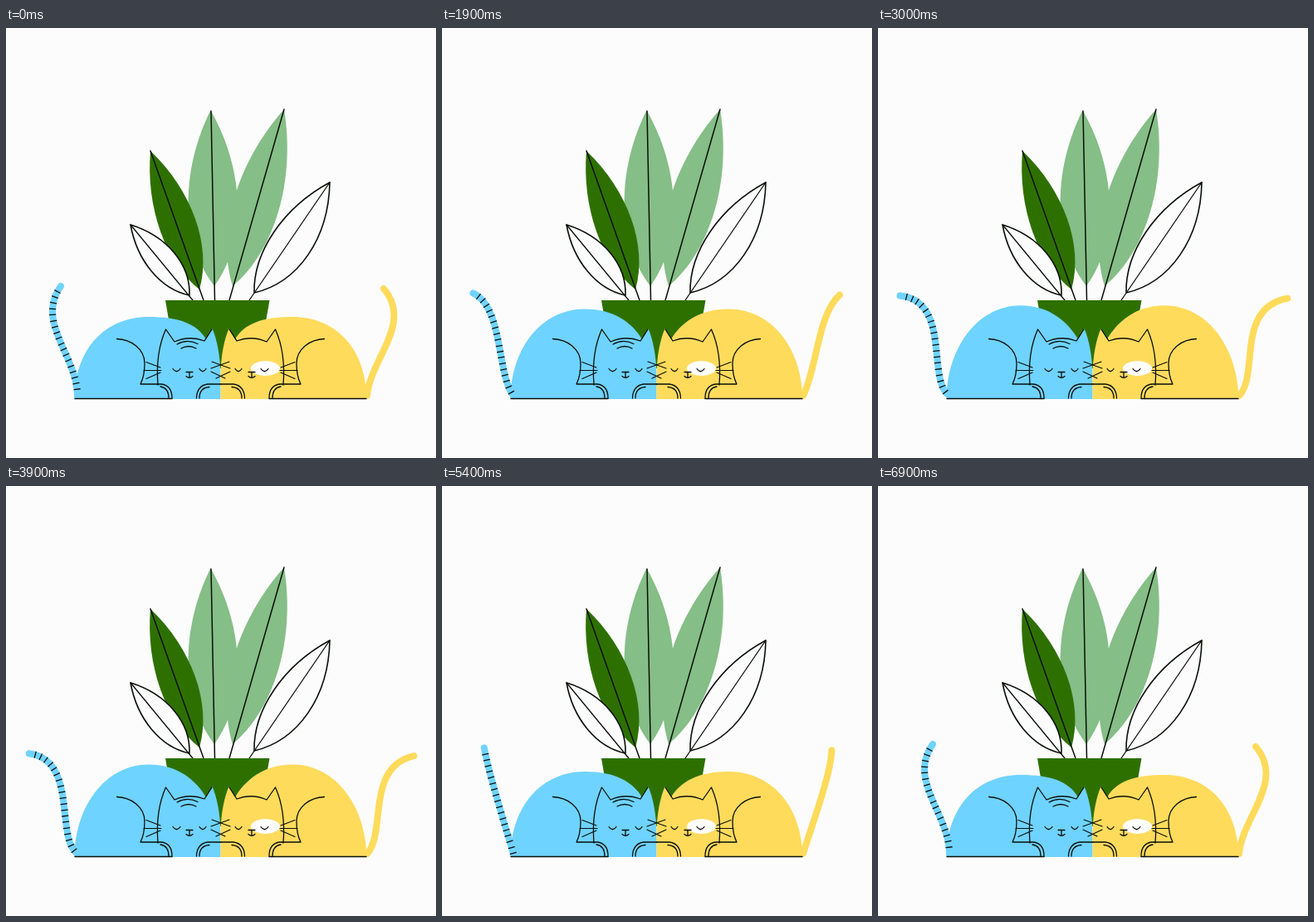
Recreate the animation shown at these times as an HTML page with a canvas. Size 518x518 px, loop 7000 ms.

```html
<!DOCTYPE html>
<html lang="en">
<head>
<meta charset="utf-8">
<title>Sleeping cats</title>
<style>
html, body { margin: 0; width: 100%; height: 100%; overflow: hidden; background: #fcfcfc; }
canvas { display: block; width: 518px; height: 518px; }
</style>
</head>
<body>
<canvas id="stage" width="518" height="518"></canvas>
<script>
const ctx = document.getElementById('stage').getContext('2d');
const LOOP = 7000, STEP = 100, PEAK = 3300, REST = 6900;
const MIRROR = 517, SOIL = 328;
const BG = '#fcfcfc', INK = '#0a0f0a', BLUE = '#6fd3ff', YELLOW = '#ffdb5c';
const DARK = '#2e7000', LIGHT = '#85be86';

const easeSine = u => (1 - Math.cos(Math.PI * u)) / 2;
const easeOut = u => 1 - (1 - u) ** 1.4;

// Each tail is a cubic curve [x, y] * 4 that swings from one pose to another
const blueTail = {
  color: BLUE, rise: easeOut,
  from: [[86, 443], [86, 395], [35, 355], [66, 311]],
  to: [[86, 443], [57, 426], [91, 328], [25, 323]]
};
const yellowTail = {
  color: YELLOW, rise: easeSine,
  from: [[435, 443], [438, 400], [491, 356], [455, 314]],
  to: [[435, 443], [460, 418], [429, 337], [494, 326]]
};

function fill(d, color) {
  ctx.fillStyle = color;
  ctx.fill(new Path2D(d));
}

function line(d, width = 1.3, color = INK) {
  ctx.lineWidth = width;
  ctx.strokeStyle = color;
  ctx.stroke(new Path2D(d));
}

function mirrored(draw) {
  ctx.save();
  ctx.translate(MIRROR, 0);
  ctx.scale(-1, 1);
  draw();
  ctx.restore();
}

// A blade between tip and base, bulging by its own amount on each side
function drawLeaf([tx, ty], [bx, by], left, right, color) {
  const dx = bx - tx, dy = by - ty, len = Math.hypot(dx, dy);
  const at = (along, off) =>
    `${tx + dx * along + dy / len * off} ${ty + dy * along - dx / len * off} `;
  const blade = `M${tx} ${ty}C${at(0.35, -left)}${at(0.75, -left)}${bx} ${by}` +
    `C${at(0.75, right)}${at(0.35, right)}${tx} ${ty}Z`;
  fill(blade, color);
  if (color === BG) line(blade, 1.6);
}

function drawPlant() {
  drawLeaf([246.5, 99], [251, 311], 39, 40, LIGHT);
  drawLeaf([335, 98], [273, 311], 37, 37, LIGHT);
  drawLeaf([174, 148], [233, 315], 28, 31.5, DARK);
  drawLeaf([150, 237], [221, 322], 22, 25, BG);
  drawLeaf([390, 186], [299, 319], 29, 37, BG);
  line(`M247 100L251.5 ${SOIL}M335 98L269 ${SOIL}M174 148L238 ${SOIL}`, 1.5);
  line(`M150 237L225 ${SOIL}M390 186L293 ${SOIL}`, 1.3);
  fill(`M192 ${SOIL}H317.5L303 410H206Z`, DARK);
}

function drawBody(color, top) {
  fill(`M82.5 447C83 387 119 ${top} 172 ${top}C208 ${top} 230 356 241 375L248.5 362
    C254 375 258.5 395 258.5 420V447Z`, color);
}

function swingTail({ from, to, rise }, t) {
  const k = t < PEAK ? rise(t / PEAK) : easeSine(Math.max(0, (REST - t) / (REST - PEAK)));
  return from.map((p, i) => p.map((v, j) => v + (to[i][j] - v) * k));
}

function drawTail(color, [base, ...rest]) {
  line(`M${base}C${rest.join(' ')}`, 8, color);
}

// Evenly spaced rings, counted from the tip
function drawRings([a, b, c, d]) {
  const gap = 7.3, reach = 3.6;
  const point = s => [0, 1].map(i => {
    const r = 1 - s;
    return r ** 3 * a[i] + 3 * r * r * s * b[i] + 3 * r * s * s * c[i] + s ** 3 * d[i];
  });
  let [px, py] = d, left = gap;
  for (let s = 0.995; s >= 0; s -= 0.005) {
    const [x, y] = point(s);
    const dx = x - px, dy = y - py, len = Math.hypot(dx, dy);
    left -= len;
    if (left <= 0) {
      const nx = -dy / len * reach, ny = dx / len * reach;
      line(`M${x - nx} ${y - ny}L${x + nx} ${y + ny}`);
      left += gap;
    }
    [px, py] = [x, y];
  }
}

function drawCatLines() {
  line('M83 446.5H200');
  // Haunch and outer paw
  line('M133.5 374.5C151 375 167 387 167 404C167 415 165 423 162 429H187C196 430 200 437 200 446M186 432C193 433 196 438 196 446');
  // Inner paw
  line('M258.5 429H243C234 430 229.5 437 229.5 446M245 432.5C237 433 233 438 233 446');
  // Head
  line('M183 430C181 405 184 382 192.5 363L203 378Q221 370 239 377L248 363');
  // Closed eyes, nose and mouth
  line('M201 410.5Q205.5 417 210 410.5M233 410.5Q237 417 241 410.5M217 414.5H225M221 414.5V420M217 419.5Q221 423 225 419.5');
  // Whiskers
  line('M169 402.5L186 409M166 412.5H187M169 422.5L186 415M247 410L269 402M247 414L264 422', 1.2);
}

function render(now) {
  const t = Math.floor(now % LOOP / STEP) * STEP;
  const top = 348.2 - 14 * easeSine((t + 300) / LOOP * 2);
  const blueCurve = swingTail(blueTail, t);

  ctx.fillStyle = BG;
  ctx.fillRect(0, 0, 518, 518);
  ctx.lineCap = ctx.lineJoin = 'round';
  drawPlant();
  drawTail(BLUE, blueCurve);
  drawTail(YELLOW, swingTail(yellowTail, t));
  drawBody(BLUE, top);
  mirrored(() => drawBody(YELLOW, top));
  drawRings(blueCurve);

  // Eye patch
  ctx.fillStyle = '#fff';
  ctx.beginPath();
  ctx.ellipse(312.5, 410, 17.5, 9, 0, 0, 2 * Math.PI);
  ctx.fill();

  drawCatLines();
  mirrored(drawCatLines);
  line('M206 381Q218 374 231 380.5M211 386Q220 381 229 386');
}

const start = performance.now();
function tick() {
  render(performance.now() - start);
  requestAnimationFrame(tick);
}
tick();
</script>
</body>
</html>
```
